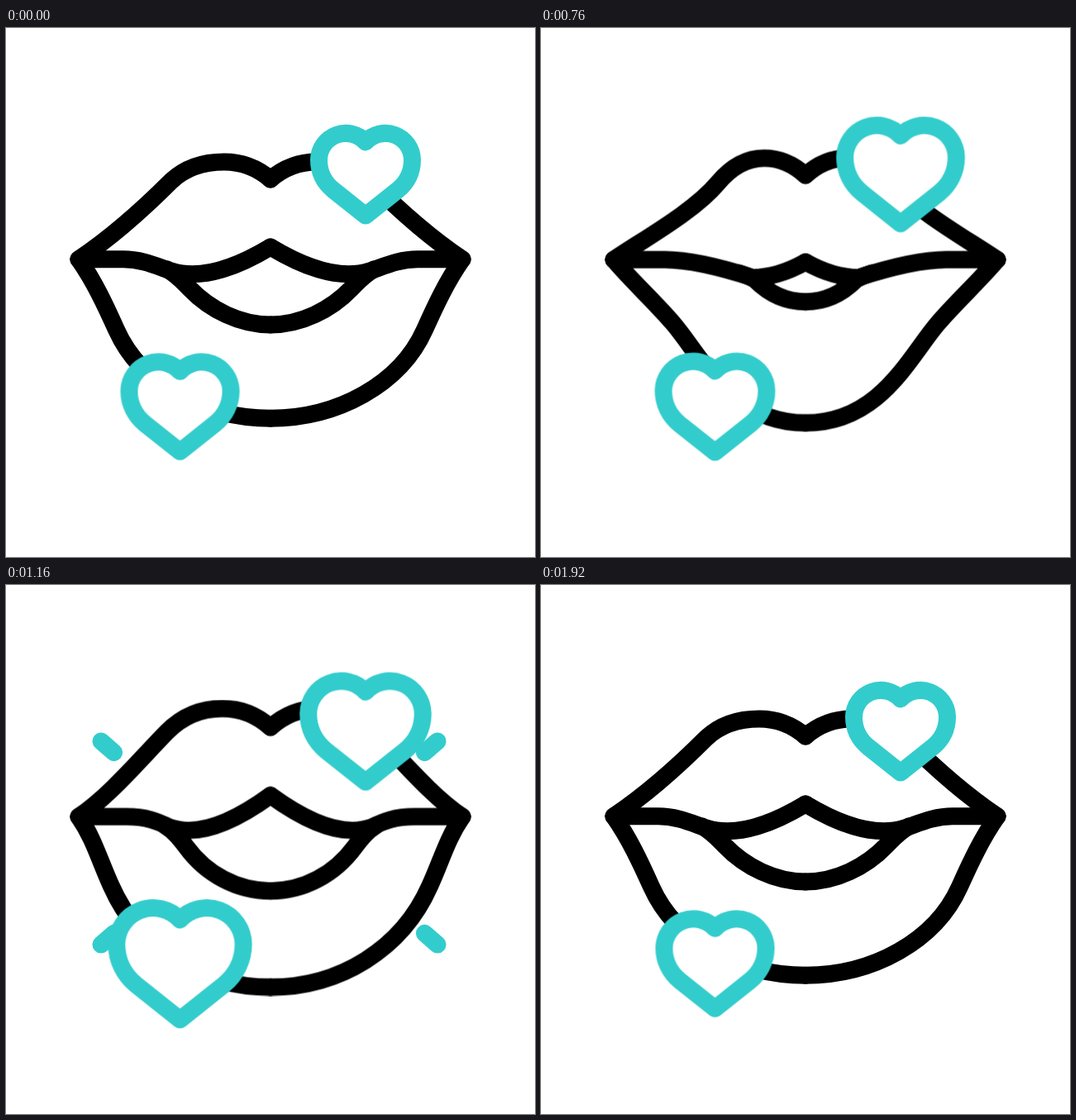
An HTML page for the animation above (2 s loop, 640 by 640 pixels).

```html
<!DOCTYPE html>
<html lang="en">
<head>
<meta charset="utf-8">
<title>Kiss</title>
<style>
  html, body { margin: 0; width: 100%; height: 100%; overflow: hidden; background: #fff; }
  svg { display: block; width: 100%; height: 100%; }
  path { fill: none; stroke: #000; stroke-width: 21; stroke-linecap: round; stroke-linejoin: round; }
  .lips, .lips path, .heart { animation: 2s cubic-bezier(.37, 0, .63, 1) infinite; }

  .lips { animation-name: settle; }
  .lips .bow { animation-name: bow; }
  .lips .mouth { animation-name: mouth; }
  .lips .inner { animation-name: inner; }
  .lips .chin { animation-name: chin; }

  @keyframes settle {
    0%, 20%, 96%, 100% { transform: translateY(0); }
    38%, 72% { transform: translateY(.5px); }
  }

  /* Left half of each line: rest, pucker, open */
  @keyframes bow {
    0%, 20%, 70%, 100% { d: path("M88 279.8 C125 255 165 220 200 185 C216 170 238 162 264 162 C286 162 305 170 320 183"); }
    38% { d: path("M88 279.8 C127 253.5 185 221.5 214 187 C229 169 247 157 270 157 C290 157 306 165 320 177.7"); }
    50% { d: path("M88 279.8 C125 255 160 206 192 173 C211 153 234 142 260 142 C283 142 303 150 320 165.7"); }
  }
  @keyframes mouth {
    0%, 20%, 70%, 100% { d: path("M88 279.8 L142 279.8 C165 279.8 182 288 200 294 C240 306.5 285 286 320 265"); }
    38% { d: path("M88 279.8 L150 279.8 C185 280 225 291.5 256 301.5 C275 301.5 298 295 320 282.7"); }
    50% { d: path("M88 279.8 L148 279.8 C172 279.8 184 284 197 292 C235 306 282 278 320 248"); }
  }
  @keyframes inner {
    0%, 20%, 70%, 100% { d: path("M195 292 C207 299 213 306 222 315 C247 341 283 359 320 359"); }
    38% { d: path("M240 296 C247 298 252 300 259 304 C276 321 296 330.7 320 330.7"); }
    50% { d: path("M190 289 C201 296 208 305 216 317 C240 354 278 375.3 320 375.3"); }
  }
  @keyframes chin {
    0%, 20%, 70%, 100% { d: path("M88 279.8 C107 307 120 335 133.5 365 C163 431 239 472.2 320 472.2"); }
    38% { d: path("M88 279.8 C112 308 137 330 160 357 C195 398 230 477.2 320 477.2"); }
    50% { d: path("M88 279.8 C106 306 110 333 124 363 C160 445 235 493.5 320 493.5"); }
  }

  .spark { stroke: #33cccc; animation: spark 2s linear infinite; }
  @keyframes spark {
    0%, 46% { d: path("M212 274 L212 274"); visibility: hidden; }
    46.01% { d: path("M212 274 L211.9 273.9"); visibility: visible; }
    50% { d: path("M212 274 L178 245"); }
    54% { d: path("M175 242 L133 205"); }
    58% { d: path("M131 203 L115 189"); }
    59.99% { d: path("M115.1 189.1 L115 189"); visibility: visible; }
    60%, 100% { d: path("M115 189 L115 189"); visibility: hidden; }
  }

  .heart {
    fill: #fff; stroke: #33cccc; vector-effect: non-scaling-stroke;
    d: path("M0 -39 A32.5 32.5 0 0 0 -56.5 -17.5 C-56.5 -3 -50 10 -39 19 L0 50 L39 19 C50 10 56.5 -3 56.5 -17.5 A32.5 32.5 0 0 0 0 -39 Z");
    transform-origin: 0 0;
  }
  .high { animation-name: high; }
  .low { animation-name: low; }
  @keyframes high {
    0%, 20%, 78%, 100% { transform: scale(1); }
    46.5%, 53% { transform: scale(1.25); }
  }
  @keyframes low {
    0%, 34%, 96%, 100% { transform: scale(1.09); }
    61%, 68% { transform: scale(1.365); }
  }
</style>
</head>
<body>
<svg viewBox="0 0 640 640">
  <g class="lips">
    <path class="bow"/><path class="mouth"/><path class="inner"/><path class="chin"/>
    <g transform="translate(640 0) scale(-1 1)">
      <path class="bow"/><path class="mouth"/><path class="inner"/><path class="chin"/>
    </g>
  </g>
  <path class="spark"/>
  <g transform="translate(637 0) scale(-1 1)"><path class="spark"/></g>
  <g transform="translate(0 624) scale(1 -1)"><path class="spark"/></g>
  <g transform="translate(637 624) scale(-1 -1)"><path class="spark"/></g>
  <g transform="translate(435 177)"><path class="heart high"/></g>
  <g transform="translate(210.5 458)"><path class="heart low"/></g>
</svg>
</body>
</html>
```
